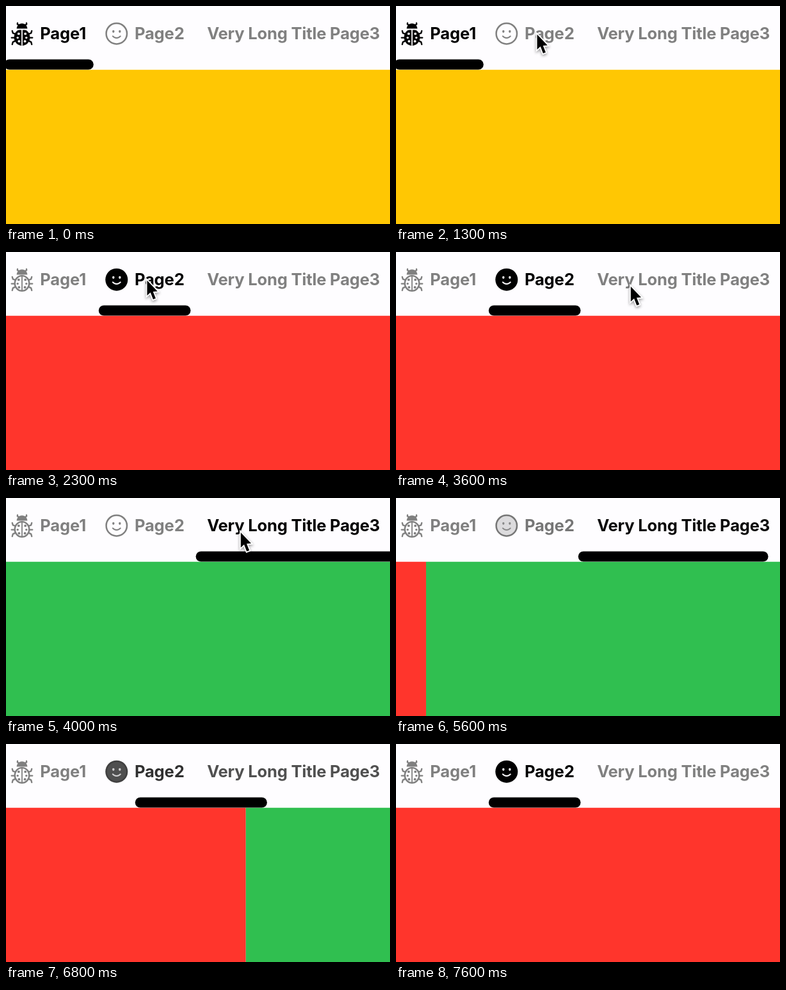
An HTML page with a canvas for the animation above (8 s loop, 600 by 341 pixels).

```html
<!DOCTYPE html>
<html lang="en">
<head>
<meta charset="utf-8">
<title>Tab pager</title>
<style>
html, body { margin: 0; width: 100%; height: 100%; overflow: hidden; background: #fefdff; }
canvas { display: block; width: 600px; height: 341px; }
</style>
</head>
<body>
<canvas id="stage"></canvas>
<script>
const W = 600, H = 341, HEAD = 99.75, LOOP = 8000;
const PAPER = '#fefdff', GREY = 128;
const scale = Math.max(1, window.devicePixelRatio || 1);
const pages = ['#ffc703', '#ff352c', '#30bf50'];
const tabs = [
  { text: 'Page1', x: 53.3, bar: [-3, 136.8], icon: 'bug' },
  { text: 'Page2', x: 200.9, bar: [144.8, 288.5], icon: 'face' },
  { text: 'Very Long Title Page3', x: 314.2, bar: [296.6, 606.5] }
];

// [time, page position]
const pageKeys = [[5230, 2], [5600, 1.922], [6100, 1.74], [6800, 1.376], [7100, 1.16], [7350, 1.03], [7600, 1]];
// [time, x, y] of the pointer tip
const enterKeys = [[100, 190, 304], [400, 203, 190], [700, 217, 72], [900, 220.5, 44.5]];
const exitKeys = [[4500, 366.8, 54], [4600, 325, 118], [4700, 235, 246], [4800, 190, 310]];

function setup(canvas, w, h) {
  canvas.width = w * scale;
  canvas.height = h * scale;
  const c = canvas.getContext('2d');
  c.scale(scale, scale);
  c.lineCap = c.lineJoin = 'round';
  return c;
}

const ctx = setup(document.getElementById('stage'), W, H);

function layer(paint) {
  const canvas = document.createElement('canvas');
  paint(setup(canvas, 300, 100));
  return canvas;
}

const mix = (a, b, p) => a + (b - a) * p;
const clamp = v => Math.min(1, Math.max(0, v));
const smooth = p => p * p * (3 - 2 * p);
const span = (t, from, to) => clamp((t - from) / (to - from));

// Hermite interpolation through the keys, flat at both ends.
function follow(keys, t, k) {
  const last = keys.length - 1;
  if (t <= keys[0][0]) return keys[0][k];
  if (t >= keys[last][0]) return keys[last][k];
  let i = 0;
  while (t > keys[i + 1][0]) i++;
  const slope = j => j === 0 || j === last ? 0 :
    (keys[j + 1][k] - keys[j - 1][k]) / (keys[j + 1][0] - keys[j - 1][0]);
  const a = keys[i], b = keys[i + 1], d = b[0] - a[0], u = (t - a[0]) / d;
  return mix(a[k], b[k], smooth(u)) +
    d * u * (1 - u) * ((1 - u) * slope(i) - u * slope(i + 1));
}

function dot(c, x, y, rx, ry = rx) {
  c.beginPath();
  c.ellipse(x, y, rx, ry, 0, 0, Math.PI * 2);
  c.fill();
}

function line(c, width, ...pts) {
  c.lineWidth = width;
  c.beginPath();
  pts.forEach(([x, y], i) => i ? c.lineTo(x, y) : c.moveTo(x, y));
  c.stroke();
}

function face(c, solid) {
  c.fillStyle = c.strokeStyle = solid ? '#000' : '#808080';
  if (solid) {
    dot(c, 172.8, 43.2, 17.5);
    c.globalCompositeOperation = 'destination-out';
  } else {
    c.lineWidth = 2.5;
    c.beginPath();
    c.arc(172.8, 43.2, 16.2, 0, Math.PI * 2);
    c.stroke();
  }
  dot(c, 167.8, 39.8, 1.7, 2.1);
  dot(c, 177.8, 39.8, 1.7, 2.1);
  c.lineWidth = 2;
  c.beginPath();
  c.moveTo(166.8, 47.2);
  c.bezierCurveTo(169.6, 50.8, 176, 50.8, 178.8, 47.2);
  c.stroke();
}

function bug(c, solid) {
  c.fillStyle = c.strokeStyle = solid ? '#000' : '#808080';
  for (const s of [-1, 1]) {
    const at = (x, y) => [25 + s * x, y];
    line(c, 2.3, at(4.5, 30), at(7.2, 28.6), at(7, 26.6));
    line(c, 2.4, at(10, 44), at(14.2, 42.4), at(15.2, 39));
    line(c, 2.4, at(11, 49.6), at(16.2, 49.6));
    line(c, 2.4, at(10, 54.4), at(14.2, 56.4), at(15.2, 60));
  }
  c.beginPath();
  c.moveTo(16.6, 35.6);
  c.bezierCurveTo(17.4, 24.6, 32.6, 24.6, 33.4, 35.6);
  c.closePath();
  c.fill();
  if (solid) {
    dot(c, 25, 49, 12.4, 13);
    c.globalCompositeOperation = 'destination-out';
    line(c, 1.7, [16, 36.6], [34, 36.6]);
  } else {
    c.lineWidth = 2.4;
    c.beginPath();
    c.ellipse(25, 49, 11.3, 11.9, 0, 0, Math.PI * 2);
    c.stroke();
  }
  line(c, 1.8, [25, 37], [25, 61]);
  for (const s of [-1, 1]) {
    dot(c, 25 + s * 5.2, 43.4, 1.9);
    dot(c, 25 + s * 6.8, 49.6, 1.7);
    dot(c, 25 + s * 4.6, 55.2, 1.9);
  }
}

const icons = {
  bug: [layer(c => bug(c, false)), layer(c => bug(c, true))],
  face: [layer(c => face(c, false)), layer(c => face(c, true))]
};

function pageAt(t) {
  if (t < 3000) return smooth(span(t, 1740, 2080));
  if (t < 5200) return 1 + smooth(span(t, 3630, 3980));
  return follow(pageKeys, t, 1);
}

function pointerAt(t) {
  if (t < 100 || t >= 4800) return null;
  if (t < 900) return [1, 2].map(k => follow(enterKeys, t, k));
  if (t < 4500) {
    const p = smooth(span(t, 2720, 3300));
    return [mix(220.5, 366.8, p), mix(44.5, 54, p)];
  }
  return [1, 2].map(k => follow(exitKeys, t, k));
}

function drawPages(pos) {
  pages.forEach((color, i) => {
    const x = (i - pos) * W;
    if (x <= -W || x >= W) return;
    ctx.fillStyle = color;
    ctx.fillRect(x, HEAD, W, H - HEAD);
  });
}

function drawTabs(pos) {
  ctx.font = '700 25.6px Inter, "Open Sans", sans-serif';
  ctx.letterSpacing = '-0.2px';
  ctx.textBaseline = 'alphabetic';
  tabs.forEach((tab, i) => {
    const on = clamp(1 - Math.abs(pos - i));
    const tone = Math.round(GREY * (1 - on));
    ctx.fillStyle = `rgb(${tone}, ${tone}, ${tone})`;
    ctx.fillText(tab.text, tab.x, 52);
    if (!tab.icon) return;
    [1 - on, on ** 0.8].forEach((alpha, k) => {
      ctx.globalAlpha = alpha;
      ctx.drawImage(icons[tab.icon][k], 0, 0, 300, 100);
    });
    ctx.globalAlpha = 1;
  });
}

function drawBar(pos) {
  const i = Math.min(1, Math.floor(pos));
  const [left, right] = [0, 1].map(k => mix(tabs[i].bar[k], tabs[i + 1].bar[k], pos - i));
  ctx.fillStyle = '#000';
  ctx.beginPath();
  ctx.roundRect(left, 83.4, right - left, 16.2, 8.1);
  ctx.fill();
}

function drawPointer([x, y]) {
  ctx.save();
  ctx.translate(x, y);
  ctx.beginPath();
  ctx.moveTo(0, 0);
  [[0, 23.5], [5.2, 18.8], [9.4, 29.6], [13.4, 28], [9.2, 17.6], [16.2, 17]]
    .forEach(p => ctx.lineTo(...p));
  ctx.closePath();
  ctx.shadowColor = 'rgba(0, 0, 0, .4)';
  ctx.shadowBlur = 4 * scale;
  ctx.shadowOffsetY = 2 * scale;
  ctx.lineJoin = 'miter';
  ctx.lineWidth = 3.6;
  ctx.strokeStyle = '#fff';
  ctx.stroke();
  ctx.shadowColor = 'transparent';
  ctx.fillStyle = '#000';
  ctx.fill();
  ctx.restore();
}

function draw(t) {
  const pos = pageAt(t), tip = pointerAt(t);
  ctx.fillStyle = PAPER;
  ctx.fillRect(0, 0, W, H);
  drawPages(pos);
  drawTabs(pos);
  drawBar(pos);
  if (tip) drawPointer(tip);
}

const start = performance.now();
function tick() {
  draw((performance.now() - start) % LOOP);
  requestAnimationFrame(tick);
}
tick();
</script>
</body>
</html>
```
